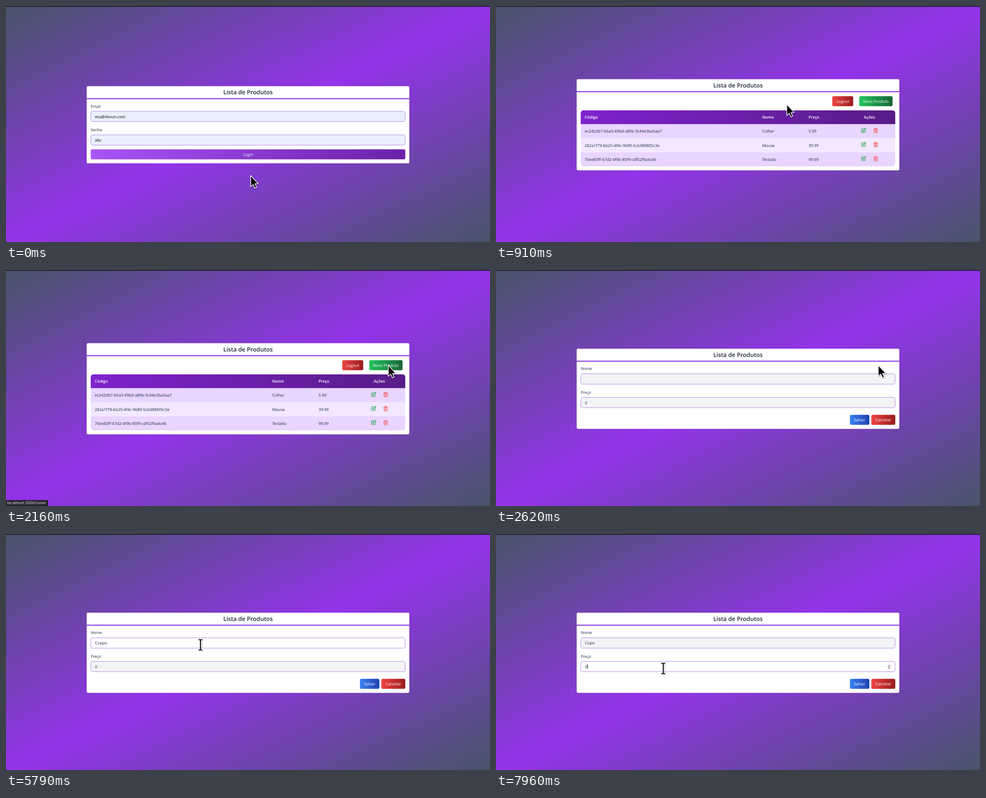
Write an HTML page that moves like this. It is 1068 px wide and 524 px high and loops after 8 s.

```html
<!DOCTYPE html>
<html lang="pt">
<head>
<meta charset="utf-8">
<title>Lista de Produtos</title>
<style>
html, body { margin: 0; width: 100%; height: 100%; overflow: hidden; background: #17151f; }
* { box-sizing: border-box; }
#stage {
  position: absolute; left: 0; top: 0; width: 1920px; height: 942px; overflow: hidden;
  transform: scale(.55625); transform-origin: 0 0;
  font: 15.7px/24px "Open Sans", "Noto Sans", sans-serif; color: #1e293b;
  text-rendering: geometricPrecision;
}
#page {
  position: absolute; inset: 3px 0 -3px;
  background: linear-gradient(to bottom right, #475569, #9333ea, #475569);
}
.card {
  position: absolute; left: 320px; width: 1280px; overflow: hidden;
  background: #fff; border-radius: 6px;
}
#login { top: 320px; height: 308px; }
#list { top: 292px; height: 364px; }
#form { top: 314px; height: 320px; }
h1 {
  margin: 0; height: 52px; padding-top: 8px; border-bottom: 4px solid #8a2fdd;
  font-size: 23.4px; line-height: 32px; font-weight: 600; text-align: center; color: #1f2937;
}
label { position: absolute; left: 16px; }
.field {
  position: absolute; left: 16px; width: 1248px; height: 42px; padding: 8px 16px;
  border: 1px solid #7e22ce; border-radius: 8px; background: #f3f4f6;
}
.first { top: 68px; }
.second { top: 162px; }
.field.first { top: 100px; }
.field.second { top: 194px; }
.filled { background: #e8f0fe; color: #000; }
.focus { background: #fff; }
.caret {
  display: none; width: 1.6px; height: 20px; margin-right: -2px;
  vertical-align: -4px; background: #1e293b;
}
.focus .caret.on { display: inline-block; }
.spin { position: absolute; right: 16px; top: 10px; width: 15px; height: 22px; background: #efefef; }
.btn {
  position: absolute; height: 40px; border-radius: 6px;
  line-height: 40px; text-align: center; color: #fff;
}
.red { background: linear-gradient(to right, #ef4444, #991b1b); }
.green { background: linear-gradient(to right, #22c55e, #166534); }
.blue { background: linear-gradient(to right, #3b82f6, #1e40af); }
.purple { background: linear-gradient(to right, #a855f7, #6b21a8); }
.table {
  position: absolute; left: 16px; top: 124px; width: 1248px; height: 224px;
  border-radius: 12px; overflow: hidden;
}
.row { position: relative; height: 56px; line-height: 56px; background: #e9d5ff; }
.row:nth-child(odd) { background: #f3e8ff; }
.row.head { background: linear-gradient(to right, #7e22ce, #581c87); color: #fff; font-weight: 600; }
.row > * { position: absolute; top: 0; }
.row > :nth-child(1) { left: 16px; }
.row > :nth-child(2) { left: 720px; }
.row > :nth-child(3) { left: 904px; }
.row > b { left: 1123px; font-weight: 600; }
.row svg { top: 13px; width: 24px; height: 24px; fill: none; stroke-width: 2; stroke-linecap: round; stroke-linejoin: round; }
.edit { left: 1110px; stroke: #16a34a; }
.trash { left: 1158px; stroke: #ef4444; }
#status {
  position: absolute; left: 0; bottom: 0; width: 167px; height: 24px; padding-left: 4px;
  border-radius: 0 5px 0 0; background: #25232e; color: #e4e4ea;
  font: 15.8px/24px Inter, "Noto Sans", sans-serif; white-space: nowrap;
}
#cursor {
  position: absolute; left: 0; top: 0; width: 1px; height: 1px; overflow: visible;
  filter: drop-shadow(1px 1.5px 1px rgba(0, 0, 0, .4));
}
</style>
</head>
<body>
<div id="stage">
  <div id="page"></div>

  <section class="card" id="login">
    <h1>Lista de Produtos</h1>
    <label class="first">Email</label>
    <div class="field filled first">eva@dovun.com</div>
    <label class="second">Senha</label>
    <div class="field filled second">abc</div>
    <div class="btn purple" style="left:16px;top:252px;width:1248px">Login</div>
  </section>

  <section class="card" id="list">
    <h1>Lista de Produtos</h1>
    <div class="btn red" style="left:1014px;top:68px;width:83px">Logout</div>
    <div class="btn green" style="left:1121px;top:68px;width:132px">Novo Produto</div>
    <div class="table" id="table">
      <div class="row head"><span>Código</span><span>Nome</span><span>Preço</span><b>Ações</b></div>
    </div>
  </section>

  <section class="card" id="form">
    <h1>Lista de Produtos</h1>
    <label class="first">Nome</label>
    <div class="field first" id="name"><span id="typed"></span><i class="caret" id="nameCaret"></i></div>
    <label class="second">Preço</label>
    <div class="field second" id="price">0<i class="caret on"></i>
      <svg class="spin" id="spin" viewBox="0 0 15 22"><path fill="#444" d="M4 8.5 7.5 4.5 11 8.5ZM4 14 7.5 18 11 14Z"/></svg>
    </div>
    <div class="btn blue" style="left:1084px;top:264px;width:77px">Salvar</div>
    <div class="btn red" style="left:1169px;top:264px;width:95px">Cancelar</div>
  </section>

  <div id="status">localhost:3000/novo</div>
</div>

<svg id="cursor">
  <path id="arrow" d="M.5 .5V25L6 20.2 9.8 28.4 13.6 26.7 10 18.7 17 18.2Z"
    fill="#000" stroke="#fff" stroke-width="1.5" stroke-linejoin="round"/>
  <g id="beam" fill="none">
    <path id="bar" d="M-4-11.5H-2Q0-11.5 0-9.5Q0-11.5 2-11.5H4M0-10V10M-4 11.5H-2Q0 11.5 0 9.5Q0 11.5 2 11.5H4"
      stroke="#fff" stroke-width="4"/>
    <use href="#bar" style="display:none"/>
    <path d="M-4-11.5H-2Q0-11.5 0-9.5Q0-11.5 2-11.5H4M0-10V10M-4 11.5H-2Q0 11.5 0 9.5Q0 11.5 2 11.5H4"
      stroke="#000" stroke-width="2"/>
  </g>
</svg>

<script>
const $ = id => document.getElementById(id);
const LOOP = 8000, TICK = 1000 / 24;

const products = [
  ['ec242db7-b6a3-496d-a89e-3c44e3ba5aa7', 'Colher', '5.99'],
  ['282a1f79-bb25-4f4c-9689-5cb388805c3e', 'Mouse', '39.99'],
  ['70ee83ff-67d2-4f9b-85f9-cdf52f9a4c46', 'Teclado', '99.99']
];
const icon = (cls, d) => `<svg class="${cls}" viewBox="0 0 24 24"><path d="${d}"/></svg>`;
const icons =
  icon('edit', 'M11 5H6a2 2 0 00-2 2v11a2 2 0 002 2h11a2 2 0 002-2v-5m-1.414-9.414a2 2 0 112.828 2.828L11.828 15H9v-2.828l8.586-8.586z') +
  icon('trash', 'M19 7l-.867 12.142A2 2 0 0116.138 21H7.862a2 2 0 01-1.995-1.858L5 7m5 4v6m4-6v6m1-10V4a1 1 0 00-1-1h-4a1 1 0 00-1 1v3M4 7h16');
for (const cells of products) {
  const row = cells.map(c => `<span>${c}</span>`).join('') + icons;
  $('table').insertAdjacentHTML('beforeend', `<div class="row">${row}</div>`);
}

// time, x, y of the pointer
const path = [
  [460, 539.5, 376], [625, 552, 338], [708, 552, 338], [917, 641, 218],
  [1083, 716, 190], [1291, 794, 178], [1625, 842, 207], [2125, 842, 207],
  [2166, 843, 211], [2667, 843, 211], [2950, 640, 234], [3200, 429, 247],
  [3250, 429, 247], [3291, 429, 246], [7042, 429, 246], [7400, 392, 314],
  [7625, 369, 300], [7917, 369, 300], [7958, 369, 298.5]
];
const typing = [[0, ''], [4620, 'C'], [4910, 'Co'], [5080, 'Copp'], [5160, 'Coppo'], [7080, 'Copo']];

const within = (v, a, b) => v >= a && v < b;
const show = (id, on) => { $(id).style.display = on ? '' : 'none'; };

function pointer(t) {
  const i = path.findIndex(p => p[0] > t);
  if (i === 0) return path[0].slice(1);
  if (i < 0) return path[path.length - 1].slice(1);
  const [a, b] = [path[i - 1], path[i]];
  const u = (t - a[0]) / (b[0] - a[0]);
  return [a[1] + (b[1] - a[1]) * u, a[2] + (b[2] - a[2]) * u];
}

function statusAlpha(t) {
  const fadeIn = (t - 1800) / 110, fadeOut = (2590 - t) / 150;
  return Math.max(0, Math.min(1, fadeIn, fadeOut));
}

function render(t) {
  const tick = Math.floor((t + 8) / TICK) * TICK;
  const onForm = t >= 2210;
  show('login', t < 750);
  show('list', within(t, 750, 2210));
  show('form', onForm);
  $('status').style.opacity = statusAlpha(tick);

  const [x, y] = pointer(tick + .5);
  const overName = onForm && within(y, 230, 253.5);
  const overPrice = onForm && within(y, 282.5, 305.5);
  $('cursor').style.transform = `translate(${x}px, ${y}px)`;
  show('arrow', !overName && !overPrice);
  show('beam', overName || overPrice);

  const priceFocus = t >= 7650;
  $('name').classList.toggle('focus', within(t, 3245, 7650));
  $('price').classList.toggle('focus', priceFocus);
  show('spin', priceFocus || overPrice);
  $('typed').textContent = typing.filter(k => k[0] <= t).pop()[1];
  $('nameCaret').classList.toggle('on', t < 3870 || within(t, 4460, 5790) || t >= 7080);
}

const start = performance.now();
function loop() {
  render((performance.now() - start) % LOOP);
  requestAnimationFrame(loop);
}
loop();
</script>
</body>
</html>
```
